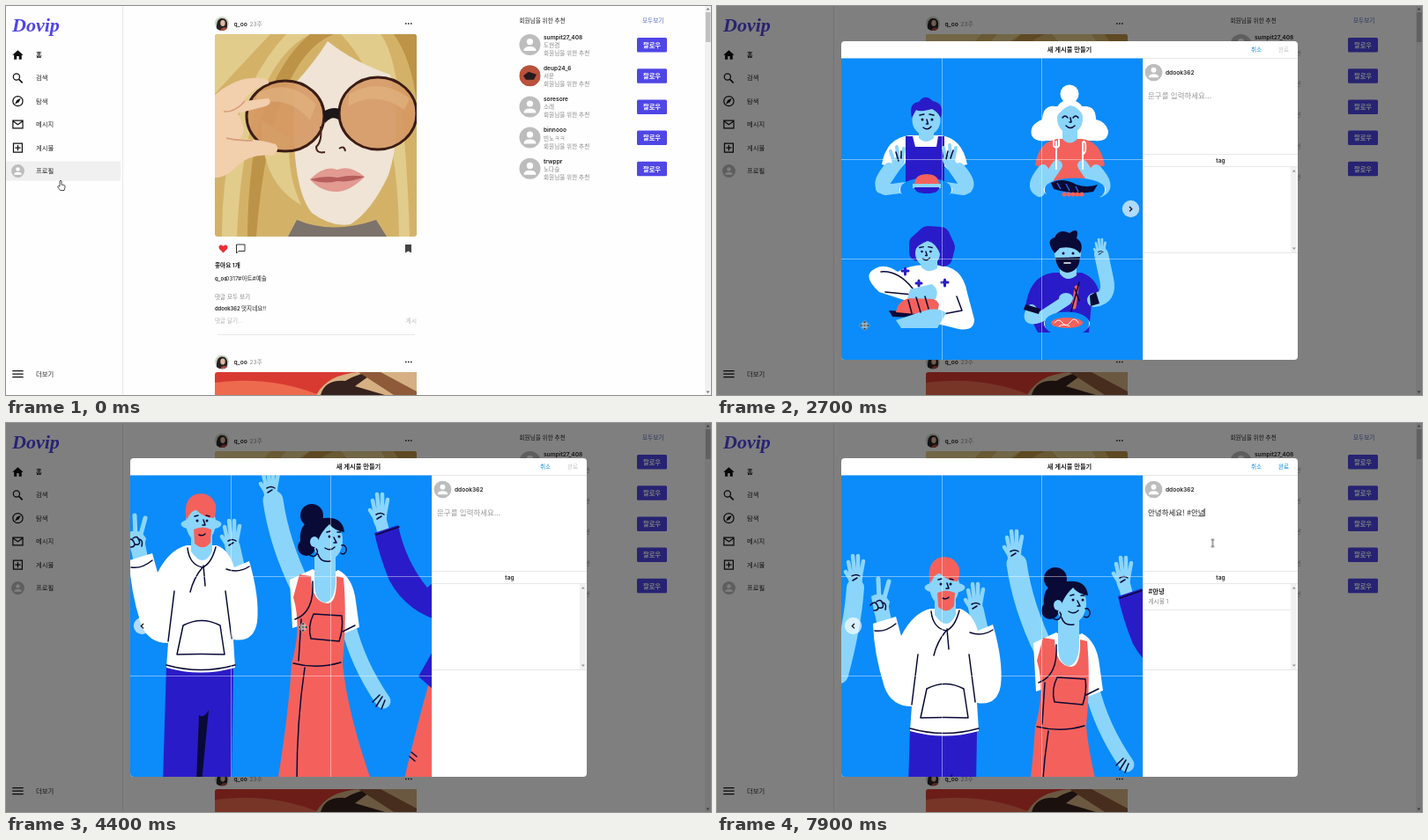
An HTML page for the animation above (8000 ms loop, 800 by 442 pixels).

```html
<!DOCTYPE html>
<html lang="ko">
<head>
<meta charset="utf-8">
<title>새 게시물 만들기</title>
<style>
html,body{margin:0;width:100%;height:100%;overflow:hidden;background:#fefefe}
svg{display:block;width:800px;height:442px}
text{font:6.6px Inter,"Noto Sans CJK KR",sans-serif;fill:#222}
.b,.b text{font-weight:600}
.g{fill:#888}.lg{fill:#b5b5b5}.blue{fill:#0a8ce0}
.mid{text-anchor:middle}
.m,.nav text{font-size:7.3px}
.type{font:300 8.5px "Noto Sans CJK KR",sans-serif}
.logo{font:italic bold 22px "Liberation Serif",serif;fill:#4f46e5}
.ln{stroke:#e3e3e3;stroke-width:.8;fill:none}
.ic{fill:none;stroke:#111;stroke-width:2}

/* illustration palette: fills, then strokes */
.s{fill:#8bd5fb}.p{fill:#2a1bc8}.k{fill:#090a36}.c{fill:#f4615c}.w{fill:#fff}
.l,.sl,.pl,.cl,.wl{fill:none;stroke-linecap:round;stroke-linejoin:round}
.l{stroke:#090a36;stroke-width:1.5}
.sl{stroke:#8bd5fb}.pl{stroke:#2a1bc8}.cl{stroke:#f4615c}.wl{stroke:#fff}

.t{animation:8s step-end infinite}
.pan{animation:pan 8s linear infinite}
.cursor{animation:cursor 8s linear infinite}
.row1{animation-name:row1}.row2{animation-name:row2}.modal{animation-name:modal}
.shots{animation-name:shots}.one{animation-name:one}.two{animation-name:two}.three{animation-name:three}
.next{animation-name:next}.prev{animation-name:prev}
.hint{animation-name:hint}.typed{animation-name:typed}.done{animation-name:done}
.pen{animation-name:pen}.under{animation-name:under}.tags{animation-name:tags}
.hand{animation-name:hand}.arrow{animation-name:arrow}.move{animation-name:move}.beam{animation-name:beam}
@keyframes row1{4.4%{opacity:0}to{opacity:0}}
@keyframes row2{0%{opacity:0}5%{opacity:1}8%{opacity:0}}
@keyframes modal{0%{opacity:0}8%{opacity:1}}
@keyframes shots{0%{opacity:0}29.9%{opacity:1}}
@keyframes one{0%{opacity:1}41%{opacity:0}}
@keyframes two{0%{opacity:0}41%{opacity:1}49.5%{opacity:0}}
@keyframes three{0%{opacity:0}49.5%{opacity:1}}
@keyframes next{0%{opacity:1}49.5%{opacity:0}}
@keyframes prev{0%{opacity:0}41%{opacity:1}}
@keyframes hint{0%{opacity:1}71.8%{opacity:0}}
@keyframes typed{0%{opacity:0}71.8%{opacity:1}}
@keyframes done{0%{fill:#c4c4c4}71.8%{fill:#0a8ce0}}
@keyframes pen{
  0%{translate:7.8px}74.8%{translate:15.6px}76.1%{translate:23.5px}78.6%{translate:31.3px}81.1%{translate:39.1px}
  84.8%{translate:41.8px}89.8%{translate:43.7px}92.3%{translate:48.4px}94.8%{translate:56.2px}97.3%{translate:64.1px}
}
@keyframes under{0%{opacity:1}84.8%{opacity:0}94.8%{opacity:1}}
@keyframes tags{0%{opacity:0}96%{opacity:1}}
@keyframes hand{0%{opacity:1}9.2%{opacity:0}16.5%{opacity:1}29.9%{opacity:0}}
@keyframes arrow{0%{opacity:0}9.2%{opacity:1}16.5%{opacity:0}62.5%{opacity:1}67%{opacity:0}}
@keyframes move{0%{opacity:0}29.9%{opacity:1}62.5%{opacity:0}}
@keyframes beam{0%{opacity:0}67%{opacity:1}}
@keyframes pan{
  0%,55.5%{translate:-37px -72px}
  56.9%{translate:0 -35px}
  58.1%,to{translate:0 0}
}
@keyframes cursor{
  0%,2%{translate:62px 198px}
  6%,9%{translate:48px 160px}
  13.75%{translate:267.5px 236px}
  18%,29.89%{translate:305px 226px}
  29.9%,34%{translate:167.5px 363px}
  40%,50%{translate:468px 232px}
  54%,55.5%{translate:337px 232px}
  62%,63.5%{translate:516px 411px}
  69%,to{translate:562.5px 136.5px}
}
</style>
</head>
<body>
<svg viewBox="0 0 800 442">
<defs>
  <clipPath id="stage"><path d="M141 59.5H483V402H145Q141 402 141 398Z"/></clipPath>
  <clipPath id="art"><rect x="237" y="32" width="229" height="230" rx="3"/></clipPath>
  <clipPath id="round"><circle r="8"/></clipPath>
  <g id="user">
    <circle r="12" fill="#bdbdbd"/><circle cy="-3.4" r="3.6" fill="#fff"/>
    <path d="M-7 7Q-7 2 0 2T7 7Z" fill="#fff"/>
  </g>
  <g id="rec">
    <use href="#user" x="594.5" y="44"/>
    <text class="g" x="610" y="56">회원님을 위한 추천</text>
    <rect x="716" y="36" width="34" height="16.5" rx="1.5" fill="#4f46e5"/>
    <text class="b m mid" x="733" y="46.8" style="fill:#fff">팔로우</text>
  </g>
  <g id="postHead">
    <g transform="translate(245 20)" clip-path="url(#round)">
      <path d="M-8-8H8V8H-8Z" fill="#cfd6c4"/>
      <path d="M-6 8Q-7-6 0-6T6 3L5 8Z" fill="#272324"/>
      <ellipse cx="1" cy="-.5" rx="2.7" ry="3.4" fill="#e3b9a0"/>
      <path d="M-2 8Q0 3 6 5V8Z" fill="#b64a43"/>
    </g>
    <text class="b" x="258.5" y="22.5">q_oo</text>
    <text class="g" x="271" y="22.5">• 23주</text>
    <path d="M453 20h1.6M456 20h1.6M459 20h1.6" stroke="#222" stroke-width="1.6"/>
  </g>
  <g id="palm">
    <path class="sl" stroke-width="4.5" d="M-5 5L-8-9M-1 3L-3-16M3 3L3-16M6 6L9-10M-6 10L-11 2"/>
    <path class="s" d="M-8 2Q0-4 8 3Q9 14 5 20H-5Q-9 12-8 2Z"/>
    <path class="l" d="M-4 7Q1 4 5 7M-3 12L2 9"/>
  </g>
  <g id="eyes"><circle class="k" cx="-5" r="1.5"/><circle class="k" cx="6" r="1.5"/></g>
  <g id="face">
    <use href="#eyes"/>
    <path class="l" d="M-8-5l5-1M3-6l5 1M0 0l1.5 5h-2M-4 9Q1 13 5 8"/>
  </g>
  <g id="dish">
    <ellipse class="w" rx="30" ry="11.5"/>
    <ellipse rx="23" ry="7.5" fill="none" stroke="#0b8cfa"/>
  </g>
  <path id="steam" class="wl" stroke-width="1.3" d="M-3 0q-4-4 0-7t-1-6M2 0q-3-4 1-7t0-7"/>
  <path id="leaf" d="M0 50Q-4 20 0-10M-1 35Q-16 30-16 18Q-3 20-1 35M0 35Q14 30 15 18Q3 20 0 35M-1 15Q-14 10-14-2Q-3 0-1 15M0 15Q12 10 13-2Q3 0 0 15" fill="#1b97fb" stroke="#1b97fb" stroke-width="1"/>
  <g id="nav"><circle cx="154.5" cy="230.5" r="9.7" fill="#fff" opacity=".68"/><path d="M156 228l-2.7 2.7 2.7 2.7" fill="none" stroke="#111" stroke-width="1.3"/></g>
</defs>

<rect width="800" height="442" fill="#fefefe"/>

<!-- sidebar -->
<path class="ln" d="M132.5 0V442"/>
<path class="t row1" d="M0 176.5h130v22H0Z" fill="#f0f0f0"/>
<path class="t row2" d="M0 150h130v22H0Z" fill="#f0f0f0"/>
<text class="logo" x="7" y="29">Dovip</text>
<g class="ic" transform="translate(6 48.3) scale(.62)">
  <path d="M10 20v-6h4v6h5v-8h3L12 3 2 12h3v8z" fill="#111" stroke="none"/>
  <path d="M14 56.5l6.5 6.5" stroke-width="2.6"/><circle cx="9.5" cy="52" r="5.8"/>
  <circle cx="12" cy="96.500" r="9"/><path d="M6.500 102L10 94.500 17.500 91 14 98.500Z" fill="#111" stroke="none"/>
  <path d="M3 132H21V146H3ZM3 133L12 139.500 21 133M4 174H20V190H4ZM12 177V187M7 182H12 17M2 591H22M2 596.500H22M2 602H22"/>
</g>
<use href="#user" transform="translate(13.5 187.5) scale(.62)"/>
<g class="nav">
  <text class="b" x="34" y="58">홈</text><text x="34" y="84.3">검색</text>
  <text x="34" y="110.5">탐색</text><text x="34" y="137">메시지</text>
  <text x="34" y="163.5">게시물</text><text x="34" y="190">프로필</text>
  <text x="34" y="420.7">더보기</text>
</g>

<!-- feed -->
<use href="#postHead"/>
<g clip-path="url(#art)">
  <path d="M237 32H466V262H237Z" fill="#d3b268"/>
  <path d="M237 32H300Q250 85 237 100ZM318 32H345Q270 70 262 262H245Q245 110 318 32ZM380 32H425Q452 65 458 262H446Q445 100 380 32Z" fill="#e2cc8c"/>
  <path d="M345 32H372Q300 60 284 262H274Q275 90 345 32ZM440 32H466V110Q460 60 440 32Z" fill="#bd9347"/>
  <path d="M328 88Q350 64 365 40Q395 64 436 78Q450 145 434 192Q415 233 391 248Q370 252 347 235Q321 203 328 88Z" fill="#efe4d5"/>
  <path d="M330 243Q370 260 420 243L432 262H320Z" fill="#7c736c"/>
  <path d="M290 130Q288 200 335 226Q318 190 322 150Z" fill="#e2cc8c"/>
  <g fill="#d59a63" fill-opacity=".9" stroke="#3b1c16" stroke-width="3">
    <ellipse cx="317" cy="125" rx="44" ry="40"/><ellipse cx="422" cy="122" rx="44" ry="41"/>
  </g>
  <path d="M285 100Q320 80 352 112L345 130Q320 100 282 112ZM390 100Q425 80 458 105L452 118Q420 95 388 114Z" fill="#e1b27f" opacity=".7"/>
  <path d="M360 120Q370 114 379 117L377 129Q370 124 362 133Z" fill="#1c1718"/>
  <path d="M357 137Q359 154 352 160Q352 168 362 166M378 162Q384 158 385 165" stroke="#4a241b" stroke-width="2" fill="none"/>
  <path d="M345 197Q362 180 376 186Q390 180 407 194Q390 211 375 211Q357 211 345 197Z" fill="#e29a91"/>
  <path d="M345 197Q362 192 376 195Q392 191 407 194Q390 201 376 199Q360 203 345 197Z" fill="#b65d5a"/>
  <path d="M237 101Q262 80 286 82Q300 82 298 88Q278 94 270 108L298 105Q303 111 294 114L263 122Q274 139 266 151Q287 151 306 157Q312 164 302 170Q278 167 262 182Q250 195 237 195Z" fill="#f2cfad"/>
  <path d="M247 120Q260 121 271 108M250 150Q262 153 280 153" stroke="#d59c78" stroke-width="1.5" fill="none"/>
</g>
<path d="M246.5 280.5l-4.5-4.6q-1.5-3.4 1.5-4.4q2-.3 3 1.6q1-1.9 3-1.6q3 1 1.5 4.4Z" fill="#ed2f36"/>
<path d="M261.5 271H271V278.5H264L261.5 281Z" fill="none" stroke="#333"/>
<path d="M453 271H460V280.5L456.500 278.5 453 280.5Z" fill="#444"/>
<text class="b" x="237" y="297">좋아요 1개</text>
<text x="237" y="312"><tspan class="b" font-size="6">q_oo</tspan><tspan x="249">0317#아트#예술</tspan></text>
<text class="g" x="237" y="332.7">댓글 모두 보기</text>
<text x="237" y="346"><tspan class="b" style="font-size:5.8px">ddook362</tspan><tspan x="267">멋지네요!!</tspan></text>
<text class="lg" x="237" y="359.5">댓글 달기...</text>
<text class="lg" x="466" y="359.5" text-anchor="end">게시</text>
<path class="ln" d="M240 373.5H464"/>
<use href="#postHead" y="384.5"/>
<path d="M237 442V419Q237 416 240 416H463Q466 416 466 419V442Z" fill="#d83a31"/>
<path d="M237 428Q300 420 355 442H237Z" fill="#ee6a4f"/>
<path d="M352 442Q365 418 402 416H466V442Z" fill="#d6b083"/>
<path d="M357 442Q362 424 385 426Q402 416 418 416L396 432 430 442Z" fill="#35211d"/>
<path d="M400 416H425L466 438V442H440Z" fill="#8f5a3a"/>

<!-- suggestions -->
<text x="582.5" y="19">회원님을 위한 추천</text>
<text x="722" y="19" style="fill:#4f64b8">모두보기</text>
<use href="#rec"/><use href="#rec" y="35.2"/><use href="#rec" y="70.4"/><use href="#rec" y="105.6"/><use href="#rec" y="140.8"/>
<g transform="translate(594.5 79.2) scale(1.5)" clip-path="url(#round)">
  <path d="M-8-8H8V8H-8Z" fill="#b9513c"/><path d="M-5 0L-1-3 5-1 3 3H-3Z" fill="#241b1d"/>
</g>
<g class="b">
  <text x="610" y="37.8">sumpit27_408</text><text x="610" y="73">deup24_6</text>
  <text x="610" y="108.2">soresore</text><text x="610" y="143.4">binnooo</text>
  <text x="610" y="178.6">trwppr</text>
</g>
<text class="g" x="610" y="47">도현겸</text><text class="g" x="610" y="82.2">서운</text>
<text class="g" x="610" y="117.4">소레</text><text class="g" x="610" y="152.6">빈노ㅋㅋ</text>
<text class="g" x="610" y="187.8">노다슬</text>
<path d="M793 0h7V442h-7Z" fill="#f1f1f1"/><path d="M794 7h5.5v34h-5.5Z" fill="#c1c1c1"/>
<path d="M794.5 4.5l2-2.5 2 2.5ZM794.5 437.5l2 2.5 2-2.5Z" fill="#777"/>

<!-- dialog -->
<g class="t modal">
  <rect width="800" height="442" opacity=".5"/>
  <rect x="141" y="40" width="518" height="362" rx="4" fill="#fff"/>
  <path class="ln" d="M141 59.5H659M483.5 59.5V402M484 168.5H659M484 182.5H659M484 280.5H659"/>
  <text class="b m mid" x="400" y="52">새 게시물 만들기</text>
  <text class="blue" x="606" y="52">취소</text><text class="t done" x="637" y="52">완료</text>
  <g transform="translate(287 199) scale(2.05)" class="ic">
    <path d="M10 5H3V21H19V13"/><circle cx="15.5" cy="6.5" r="3.5"/><path d="M18 9L21.700 12.700"/>
    <path d="M5.500 18l2.750-3.500 2 2.400L13 13.300 16.500 18Z" fill="#111" stroke="none"/>
  </g>
  <text class="b mid" x="312" y="268" style="font-size:8.9px">당신의 추억을 업로드하세요!</text>
  <use href="#user" transform="translate(495.5 75.5) scale(.82)"/>
  <text class="b" x="509" y="78">ddook362</text>
  <text class="type t hint" x="489" y="104.5" style="fill:#999">문구를 입력하세요...</text>
  <g class="t typed">
    <text class="type" x="489" y="104.5">안녕하세요! #안녕</text>
    <g class="t pen" stroke="#222" stroke-width=".7">
      <path d="M489 95h72v13h-72Z" fill="#fff" stroke="none"/>
      <path d="M489.3 97V106"/><path class="t under" d="M481.5 105.7H489"/>
    </g>
  </g>
  <text class="b mid" x="571.5" y="177.8">tag</text>
  <path d="M651 183h7v97h-7Z" fill="#f1f1f1"/>
  <path d="M652.8 188.5l2-2.5 2 2.5ZM652.8 274.5l2 2.5 2-2.5Z" fill="#999"/>
  <g class="t tags">
    <text class="b m" x="489.5" y="194">#안녕</text><text class="g" x="489.5" y="205">게시물 1</text>
    <path class="ln" d="M484 212.5H651"/>
  </g>

  <g class="t shots">
    <g clip-path="url(#stage)">
      <path d="M141 59H484V403H141Z" fill="#0b8cfa"/>

      <!-- four diners -->
      <g class="t one" stroke-width="12">
        <path class="w" d="M187 180Q192 150 218 147H254Q278 150 284 180L262 186 254 177V204H214V178L207 186Z"/>
        <path class="p" d="M214 148H222L225 160H249L251 148H258V204H214Z"/>
        <path class="sl" d="M195 184Q178 204 191 209L222 205M275 184Q293 204 280 209L252 205M186 207L207 176M284 207L262 175"/>
        <path class="s" d="M229 140H246V150Q237 158 229 150Z"/>
        <ellipse class="s" cx="237.5" cy="130" rx="16" ry="17"/>
        <path class="p" d="M221 127Q217 110 229 109Q236 99 245 108Q259 111 254 127Q249 119 244 117Q229 121 226 118Z"/>
        <use href="#face" x="238" y="129"/>
        <path class="sl" stroke-width="4" d="M201 178L197 165M206 174L204 160M210 175L212 162M260 174L257 161M265 172L264 158M268 175L271 161"/>
        <path class="l" d="M203 166l3 10M209 165v8M262 165l-2 9M268 164l-3 9"/>
        <use href="#dish" x="237" y="209"/>
        <path class="c" d="M224 202Q225 191 238 191T252 202Z"/><path class="s" d="M222 202H254V207H222Z"/><path class="p" d="M224 206H252Q252 213 238 213T224 206Z"/>

        <path class="w" d="M384 114Q370 112 369 129Q354 135 357 147Q361 155 375 153H428Q444 155 444 142Q441 131 430 129Q430 113 416 114Z"/>
        <path class="c" d="M361 181Q365 154 386 151H414Q435 153 440 181L421 187 419 205H381V187Z"/>
        <path class="sl" d="M370 186Q354 205 366 211L386 181M430 186Q448 205 435 211L415 181"/>
        <path class="s" d="M392 140H409V151Q400 160 392 151Z"/>
        <ellipse class="s" cx="400.5" cy="128" rx="14.5" ry="17"/><circle class="w" cx="400" cy="100" r="10.5"/>
        <path class="w" d="M384 128Q383 107 400 107T418 128Q410 114 401 113Q391 116 384 128Z"/>
        <path class="l" d="M392 127q3-4 6 0M404 127q3-4 6 0M401 127l1 5h-2M396 136q5 5 10 0"/>
        <path class="wl" stroke-width="2" d="M385 185V154M382 152v7q3 4 6 0v-7M415 185V155q4-4 3 10l-2 3"/>
        <use href="#dish" transform="translate(406 209) scale(1.18 1)"/>
        <path class="k" d="M379 201Q392 194 408 203Q420 207 432 203L427 211Q407 215 382 208Z"/>
        <path d="M386 201l4 7M396 202l4 8M407 205l3 6" stroke="#2b67dc" stroke-width="1.5"/>
        <path class="cl" stroke-width="5" stroke-dasharray="0 5" d="M394 214H418"/>

        <path class="w" d="M205 302Q223 292 245 295Q278 292 284 326L292 356Q292 370 274 367L214 352 212 334 184 325Q163 306 180 298Q191 292 205 302Z"/>
        <path class="pl" stroke-width="20" d="M228 280V270L239 260 254 261 260 274 257 286"/>
        <path class="s" d="M231 285H250V298Q240 305 232 297Z"/>
        <ellipse class="s" cx="239" cy="281" rx="14" ry="15"/>
        <path class="p" d="M224 278Q226 258 244 262Q257 264 254 284Q249 269 239 267Q228 271 224 278Z"/>
        <use href="#face" transform="translate(237 279) scale(.9)"/>
        <path class="pl" stroke-width="3" d="M210 301h7M213.5 298v7M255 314h7M258.5 311v7M226 315h6M229 312v6"/>
        <path class="l" d="M186 302Q205 300 222 321M191 325L222 328M272 330L278 346 246 352"/>
        <path class="k" d="M195 346L258 350 251 355 199 353Z"/>
        <path class="c" d="M203 348Q205 333 224 331Q247 328 252 339L249 352Z"/>
        <path class="s" d="M219 322L244 316Q253 323 248 333L216 332ZM236 346Q252 342 260 349L250 366H209L203 357Z"/>
        <path class="l" d="M217 334l4 15M226 331l5 17M236 330l4 14"/>

        <path class="p" d="M350 343Q354 307 381 303H414Q430 309 434 326L425 337 422 371H364Z"/>
        <path class="sl" stroke-width="16" d="M428 334Q447 332 442 310L436 282"/>
        <path class="sl" d="M357 345Q349 361 368 353L397 334"/>
        <use href="#palm" transform="translate(435 275) scale(.62)"/>
        <path class="s" d="M389 288H408V306Q397 315 389 304Z"/><ellipse class="s" cx="398" cy="281" rx="15" ry="17"/>
        <path class="k" d="M383 281Q372 266 383 263Q388 252 400 258Q412 250 408 264Q417 270 412 281Q405 272 389 275ZM384 286Q398 286 412 285Q411 302 397 303Q386 301 384 286ZM350 339l17 5-2 6-17-5ZM423 329l7-4 4 13-10 3Z"/>
        <path class="wl" stroke-width="1.5" d="M394 292h7"/><use href="#eyes" x="398" y="281"/>
        <path class="cl" stroke-width="5" d="M408 320L405 342"/><path class="l" d="M411 314L401 350M406 321l5 14"/>
        <ellipse class="s" cx="396" cy="332" rx="8" ry="6"/>
        <use href="#dish" transform="translate(397 361) scale(.87 1)"/>
        <ellipse class="c" cx="397" cy="360" rx="18" ry="6"/>
        <path class="wl" stroke-width="1" d="M383 360q5-6 9 0t9-1 9 1M388 364q6-4 12 0"/>
      </g>

      <!-- cafe table -->
      <g class="t two" stroke-width="12">
        <path d="M170 324Q160 207 205 195Q240 190 248 240V324ZM365 324Q370 205 415 194Q463 198 455 324Z" fill="#087eee"/>
        <use href="#leaf" x="206" y="258"/><use href="#leaf" x="424" y="258"/>
        <path class="l" d="M161 324.5H465M229 264L220 346M256 264L267 340M236 264L241 346M390 264L398 350M366 264L356 336M384 264L382 345"/>
        <path class="k" d="M218 165H234L242 262H226ZM389 165H405L399 264H383Z"/>
        <path class="wl" stroke-width="4" d="M219 166L227 266H264M404 166L399 266H362"/>
        <path class="p" d="M231 231H285Q309 237 309 258Q301 290 303 318H270Q271 288 259 266L267 318H246Q229 279 231 231Z"/>
        <path class="c" d="M238 155Q247 146 262 151Q282 167 283 222Q262 234 233 224Q239 190 238 155Z"/>
        <path class="s" d="M249 136H265V152Q258 159 248 153Z"/><ellipse class="s" cx="257" cy="130" rx="11" ry="17"/>
        <path class="w" d="M231 122Q226 111 238 109Q247 102 258 106Q269 110 262 119Q253 119 251 136Q242 139 247 147Q234 161 231 148Q225 139 231 122Z"/>
        <path class="l" d="M258 126v2M264 126v2M264 130l3 3-3 1M257 141q4 2 7-1"/>
        <path class="sl" d="M250 171Q259 202 280 190L304 163M260 215L284 189"/>
        <path class="cl" stroke-width="20" d="M250 163L254 184"/>
        <path class="wl" stroke-width="1.5" d="M286 181V162M283 162v5h6v-5"/>
        <path class="c" d="M307 152H319L317 171Q313 175 308 171Z"/><path class="l" d="M307 157q-8 2 1 9M303 160l5 4M300 164l6 4"/>
        <use href="#steam" x="314" y="150"/>

        <path class="c" d="M326 232H385Q390 247 386 267L378 323H352L350 276 349 323H321Q324 274 326 232Z"/>
        <path class="p" d="M340 157Q360 148 380 153Q393 172 391 235H336L340 202Z"/>
        <path class="pl" stroke-width="20" d="M332 147L344 181 357 170"/>
        <path class="sl" d="M330 125L334 143"/><use href="#palm" transform="translate(329 113) scale(.82)"/>
        <path class="s" d="M360 136H376V153Q367 160 360 151Z"/><ellipse class="s" cx="367" cy="128" rx="12" ry="17"/>
        <path class="k" d="M358 122Q354 106 367 107Q384 100 382 122L380 140Q379 154 367 153Q358 152 359 134L370 134 373 119Q362 120 358 122Z"/>
        <path class="wl" stroke-width="1.5" d="M362 141h5"/><use href="#eyes" x="364" y="127"/>
        <path class="pl" stroke-width="19" d="M377 175Q390 209 372 211L348 212"/><path class="sl" stroke-width="10" d="M341 211H331"/>
        <path class="l" d="M377 171Q376 193 356 202M329 211L337 195"/>
        <path class="k" d="M312 206H337Q337 223 324 223T312 206Z"/><circle class="c" cx="326" cy="203" r="4"/><circle class="w" cx="320" cy="205" r="3"/>
        <use href="#steam" x="317" y="202"/>
        <path class="c" d="M271 215H299L294 224H276Z"/><path class="w" d="M275 215Q282 205 295 215Z"/>
        <rect class="w" x="237" y="224" width="150" height="6" rx="2"/>
        <path class="l" d="M280 253Q286 283 283 316M252 249L265 274M353 250Q365 275 355 317M248 230L241 324M376 230L386 324"/>
        <path class="w" d="M248 318L266 316 277 328 272 334H246ZM276 319L299 317 305 343Q293 350 276 342Z"/>
        <path class="p" d="M314 331L341 330 344 345 310 350ZM355 329L378 328 393 341 390 348H356Z"/>
        <path class="wl" stroke-width="3" d="M311 349H343M357 347H391"/><path class="l" d="M248 332l24 2M277 341l26 2M283 325l7 3M322 335l7 3M365 333l7 3"/>
      </g>

      <!-- waving group -->
      <g class="t three"><g class="pan" stroke-width="20">
        <path class="sl" d="M157 187Q154 230 139 286"/><use href="#palm" x="157" y="167"/>
        <path class="sl" stroke-width="14" d="M462 183L467 202"/><use href="#palm" x="461" y="169"/>
        <path class="p" d="M455 197L482 188Q490 228 515 259L535 242V298Q493 289 472 251Q461 224 455 197Z"/>
        <path class="c" d="M522 352Q512 380 488 480H535V352Z"/><path class="p" d="M505 360L522 330V375Z"/>
        <path class="l" d="M457 199l26-9M497 446l6 5M495 451l6 5"/>

        <path class="p" d="M219 347H295L293 480H215Z"/><path class="k" d="M256 404Q262 408 267 398L259 480H253Z"/>
        <path class="sl" stroke-width="17" d="M186 208L190 228M294 212L299 234"/>
        <use href="#palm" x="293" y="199"/>
        <path class="sl" stroke-width="5" d="M184 202L183 177M189 202L195 180"/><path class="s" d="M175 197Q188 190 196 203L193 218H179Z"/>
        <path class="l" d="M174 207q5-6 8 0t-4 6M181 203q5-4 7 2t-4 5M187 204q6 0 4 8"/>
        <path class="w" d="M177 228L203 220L209 242Q222 216 242 211H276Q290 216 296 236L313 229Q325 270 322 298Q318 322 295 318L297 350Q258 361 219 350L221 322Q198 322 190 300Q178 262 177 228Z"/>
        <path class="l" d="M221 320L228 263M293 317L286 263M179 236q12 2 24-8M287 238q14 5 26-3M219 347Q258 358 297 347M238 302Q259 291 280 302L285 335Q259 334 231 335ZM243 214Q245 233 260 236Q270 232 275 213M260 236Q250 248 246 264M261 234L263 257"/>
        <path class="s" d="M247 200H271V218Q261 238 247 218Z"/><ellipse class="s" cx="258" cy="185" rx="17" ry="23"/>
        <ellipse class="s" cx="258.5" cy="187" rx="23" ry="7"/>
        <path class="c" d="M242 182Q237 159 252 153Q269 149 275 165Q276 174 273 180Q262 180 253 171Q248 170 242 182ZM250 193Q260 188 270 193L269 208Q261 218 251 209Z"/>
        <path class="l" d="M256 199q4 2 7-1M261 182l2 6h-3M251 178l4-1M264 177l4 1"/><use href="#eyes" x="259" y="183"/>

        <path class="sl" stroke-width="23" d="M340 160Q347 209 372 260"/><use href="#palm" x="337" y="139"/>
        <path class="sl" stroke-width="17" d="M425 300Q436 346 465 388"/>
        <path class="l" d="M453 389l8-8M457 394l7-11M463 397l4-10"/>
        <path class="w" d="M359 250L385 238Q400 248 414 239Q431 248 434 275L438 304L416 313L410 290 362 305Z"/>
        <path class="s" d="M387 222H411V255Q409 276 398 276Q387 273 387 253Z"/>
        <path class="c" d="M363 270L370 244L383 246Q384 276 402 277Q413 276 412 246L420 248Q424 290 419 345Q424 400 452 480H345Q358 400 361 345Q373 304 363 270Z"/>
        <path class="l" d="M365 295Q387 287 385 252M363 345Q390 352 417 344M386 289L418 291Q420 305 415 320L383 317Q379 303 386 289ZM372 295L369 342M376 350Q367 410 367 480M433 302l-14 7"/>
        <circle class="k" cx="384" cy="177" r="13"/><circle class="k" cx="378" cy="213" r="10"/>
        <ellipse class="s" cx="402" cy="205" rx="17" ry="23"/>
        <path class="k" d="M371 207Q368 180 398 180Q419 178 421 196Q409 194 404 187Q395 195 391 206Q387 220 376 217Z"/>
        <ellipse class="s" cx="387" cy="207" rx="5" ry="6"/>
        <path class="l" d="M409 202l3 6h-3M399 214q6 4 11-1M401 196l4-1M413 196h4M383 214a5 5 0 1 0 6 1M418 211a4 5 0 1 1-1 9M391 221Q394 231 405 229"/><use href="#eyes" x="409" y="201"/>
      </g></g>
      <path d="M255.5 59V402M368.5 59V402M141 174.5H483M141 287.5H483" stroke="#fff" stroke-opacity=".55" stroke-width=".8"/>
    </g>
    <g class="t next"><use href="#nav" transform="translate(624 0) scale(-1 1)"/></g>
    <use class="t prev" href="#nav"/>
  </g>
</g>

<!-- pointer -->
<g class="cursor" stroke="#222" stroke-width=".8" fill="#fff">
  <path class="t hand" d="M-1 1Q0-1 1 1V5L4 5.5Q5.5 6 5 8L4 11.5H-.5L-3.5 7.5Q-3.5 6-1 7Z"/>
  <path class="t arrow" d="M0 0V8.2L1.9 6.5 3.2 9.3 4.6 8.6 3.3 6H5.8Z"/>
  <g class="t move">
    <path d="M-4 0H4M0-4V4" stroke="#fff" stroke-width="2.4"/>
    <path d="M-5.5 0l2.5-2.5v5ZM5.5 0l-2.5-2.5v5ZM0-5.5l-2.5 2.5h5ZM0 5.5l-2.5-2.5h5Z" fill="#111" stroke="#fff" stroke-width=".6"/>
    <path d="M-4 0H4M0-4V4"/>
  </g>
  <path class="t beam" d="M-1.8-4H1.8M0-4V4M-1.8 4H1.8"/>
</g>
</svg>
</body>
</html>
```
